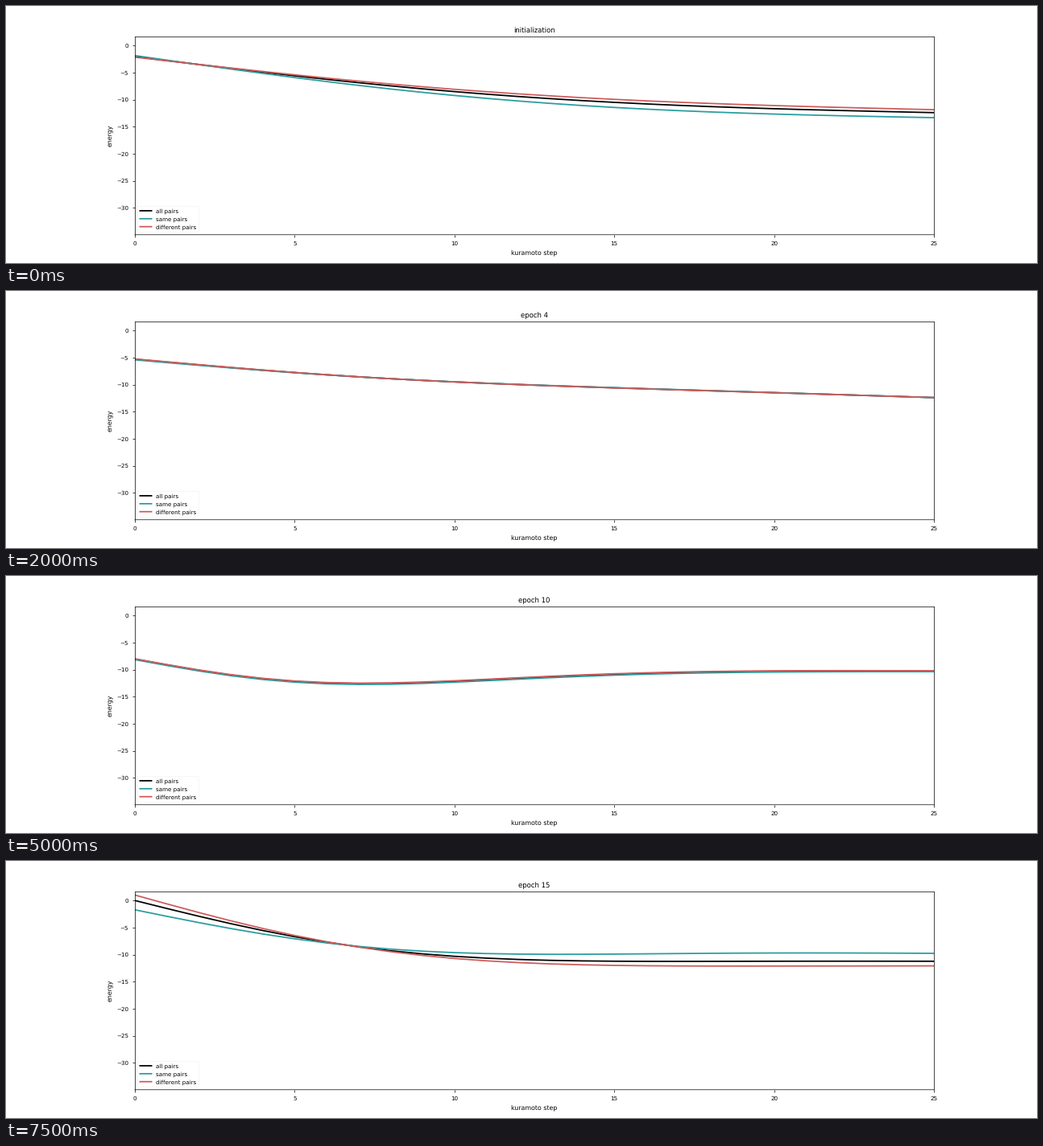
Write a matplotlib script that moves like this. It is 1280 px wide and 320 px high and loops after 8 s.

```python
import numpy as np
import matplotlib.pyplot as plt
from matplotlib.animation import FuncAnimation
from matplotlib.lines import Line2D
from matplotlib.patches import FancyBboxPatch
from matplotlib.transforms import IdentityTransform

W, H, DPI = 1280, 320, 64
EPOCHS = 16
SAME_SHARE = 0.37  # fraction of pairs that belong to the same group
STYLES = [("all pairs", "black"),
          ("same pairs", "#2a9d9f"),
          ("different pairs", "indianred")]

# Key epochs: mean energy (start, end, depth, skew), then the gap between
# same and different pairs (start, end, bow). Others are interpolated.
KEYS = {
    0: (-2.05, -12.4, -2.4, 0.03, 0.3, -1.47, -0.77),
    2: (-3.53, -8.69, -1.33, 0.13, -1.59, -3.9, 0.17),
    3: (-4.5, -33.25, -4.0, 0.1, -0.6, 0, 0),
    4: (-5.31, -12.39, -1.27, 0.22, -0.18, -0.02, 0.15),
    5: (-5.0, -8.1, -0.9, 0.2, -0.1, 0.1, 0),
    8: (-5.66, -7.1, -3.22, 0.415, -0.13, 0.56, -0.17),
    10: (-8.05, -10.27, -2.76, 0.59, -0.17, -0.17, -0.1),
    13: (-2.28, -9.6, -4.68, 0.29, -0.67, 0.9, 0.59),
    15: (0, -11.22, -5.49, 0.21, -2.73, 2.32, 1.88),
}

plt.rcParams.update({
    "font.family": "DejaVu Sans",
    "text.hinting": "no_hinting",
    "axes.titlesize": 9.6,
    "axes.labelsize": 8.8,
    "xtick.labelsize": 8,
    "ytick.labelsize": 8,
    "xtick.major.pad": 5.6,
    "ytick.major.pad": 5.6,
    "lines.linewidth": 2,
})

steps = np.arange(26)


def bend(start, end, depth, skew=0):
    """Straight line plus a sine arch that skew pushes towards the start."""
    u = steps / steps[-1]
    a = np.pi * u
    arch = np.exp(skew * np.cos(a)) * np.sin(a + skew * np.sin(a))
    return start + (end - start) * u + depth * arch


def curves(epoch):
    params = [np.interp(epoch, list(KEYS), p) for p in zip(*KEYS.values())]
    mean, gap = bend(*params[:4]), bend(*params[4:])
    return mean, mean + (1 - SAME_SHARE) * gap, mean - SAME_SHARE * gap


def draw_legend(ax):
    px = dict(transform=IdentityTransform(), zorder=5)
    box = FancyBboxPatch((163.6, H - 281.2), 75.7, 32,
                         boxstyle="round,pad=0,rounding_size=1.4",
                         fc="white", ec="0.8", lw=0.24, alpha=0.8, **px)
    ax.add_artist(box)
    for row, (label, color) in enumerate(STYLES):
        y = H - 254.95 - 9.9 * row
        ax.add_artist(Line2D([166.4, 180.6], [y, y], color=color, snap=False,
                             solid_capstyle="projecting", **px))
        ax.text(186.3, y - 2.5, label, fontsize=8, **px)


fig = plt.figure(figsize=(W / DPI, H / DPI), dpi=DPI, facecolor="white")
ax = fig.add_axes([0.125, 0.11, 0.775, 0.77])
ax.set(xlim=(0, 25), ylim=(-34.95, 1.6),
       xticks=range(0, 26, 5), yticks=range(0, -31, -5),
       xlabel="kuramoto step", ylabel="energy")
ax.spines["bottom"].set_snap(False)
title = ax.set_title("")
lines = [ax.plot([], [], color=color)[0] for _, color in STYLES]
draw_legend(ax)


def update(epoch):
    title.set_text(f"epoch {epoch}" if epoch else "initialization")
    for line, values in zip(lines, curves(epoch)):
        line.set_data(steps, values)
    return [title, *lines]


anim = FuncAnimation(fig, update, frames=EPOCHS, interval=500,
                     repeat=True, repeat_delay=0, blit=False)
plt.show()
```
